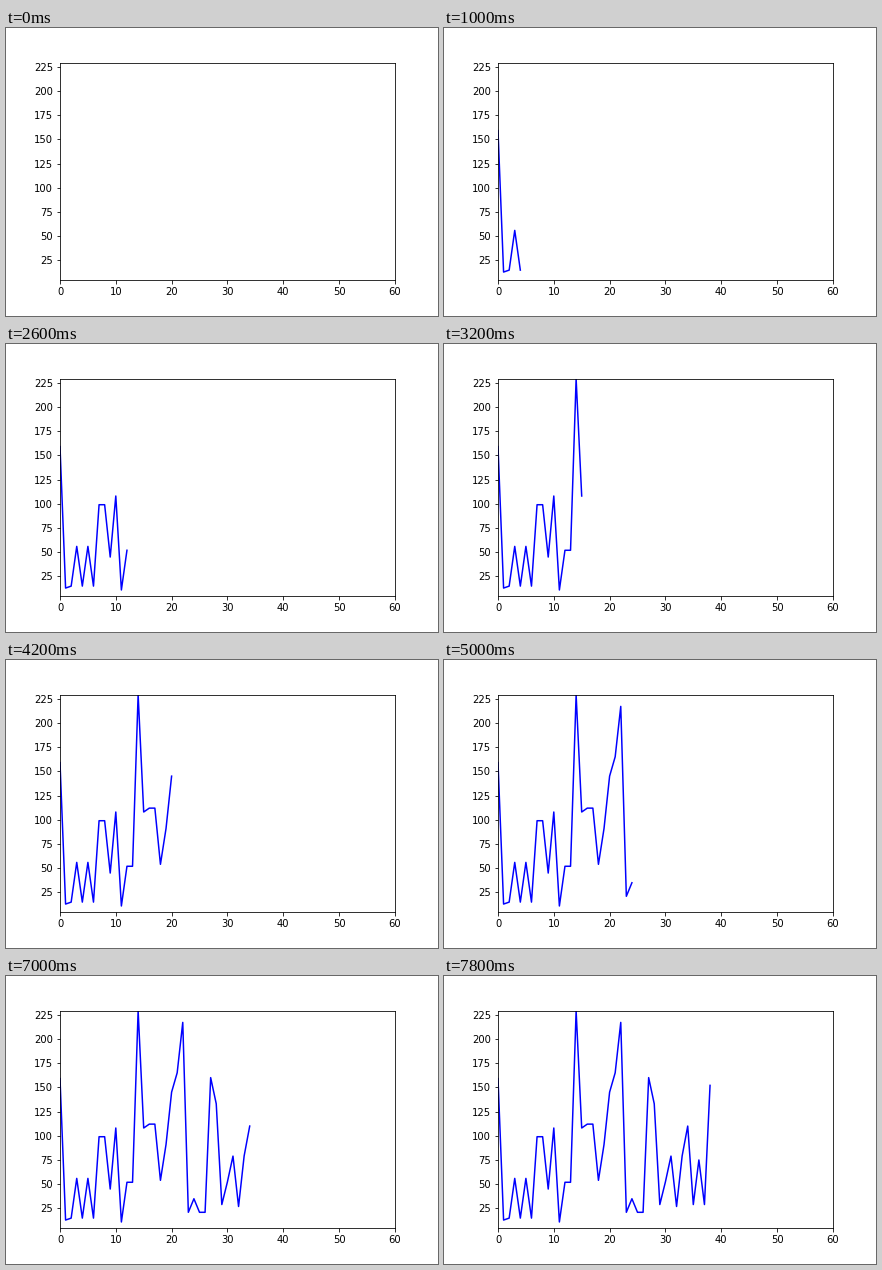
A matplotlib script that plays this animation: 432x288 px, repeating every 8000 ms.

```python
import matplotlib.pyplot as plt
from matplotlib.animation import FuncAnimation

STEP_MS = 200
FRAMES = 40


def zigzag(low, high, times):
    return [low, high] * times


def hold(value):
    return [value] * 2


def rise(low, high, bend):
    """Three steps from low to high; bend below 1 climbs early, above 1 late."""
    return [low, low + (high - low) * 0.5 ** bend, high]


def build_series():
    """Chain the swings, plateaus and climbs of the curve."""
    start = [159, 13] + zigzag(15, 56, 2) + [15] + hold(99)
    spike = [45, 108, 11] + hold(52) + [229, 108] + hold(112)
    climb = rise(54, 145, 1.3) + [165, 217]
    trough = zigzag(21, 35, 1) + hold(21) + [160, 133]
    end = rise(29, 79, 1.1) + rise(27, 110, 0.67) + zigzag(29, 75, 1) + [29, 152]
    return start + spike + climb + trough + end


series = build_series()

plt.rcParams["font.family"] = "DejaVu Sans"
fig, ax = plt.subplots(figsize=(6, 4), dpi=72)
fig.subplots_adjust(left=0.125, right=0.9, bottom=0.125, top=0.88)
ax.set_xlim(0, 60)
ax.set_ylim(4.8, 229.2)
ax.set_xticks(range(0, 61, 10))
ax.set_yticks(range(25, 226, 25))
line, = ax.plot([], [], color="blue", lw=1.5)


def draw(i):
    """Show the first i values of the series."""
    line.set_data(range(i), series[:i])
    return line,


anim = FuncAnimation(fig, draw, frames=FRAMES, init_func=lambda: draw(0),
                     interval=STEP_MS, repeat=True, repeat_delay=0)
plt.show()
```
